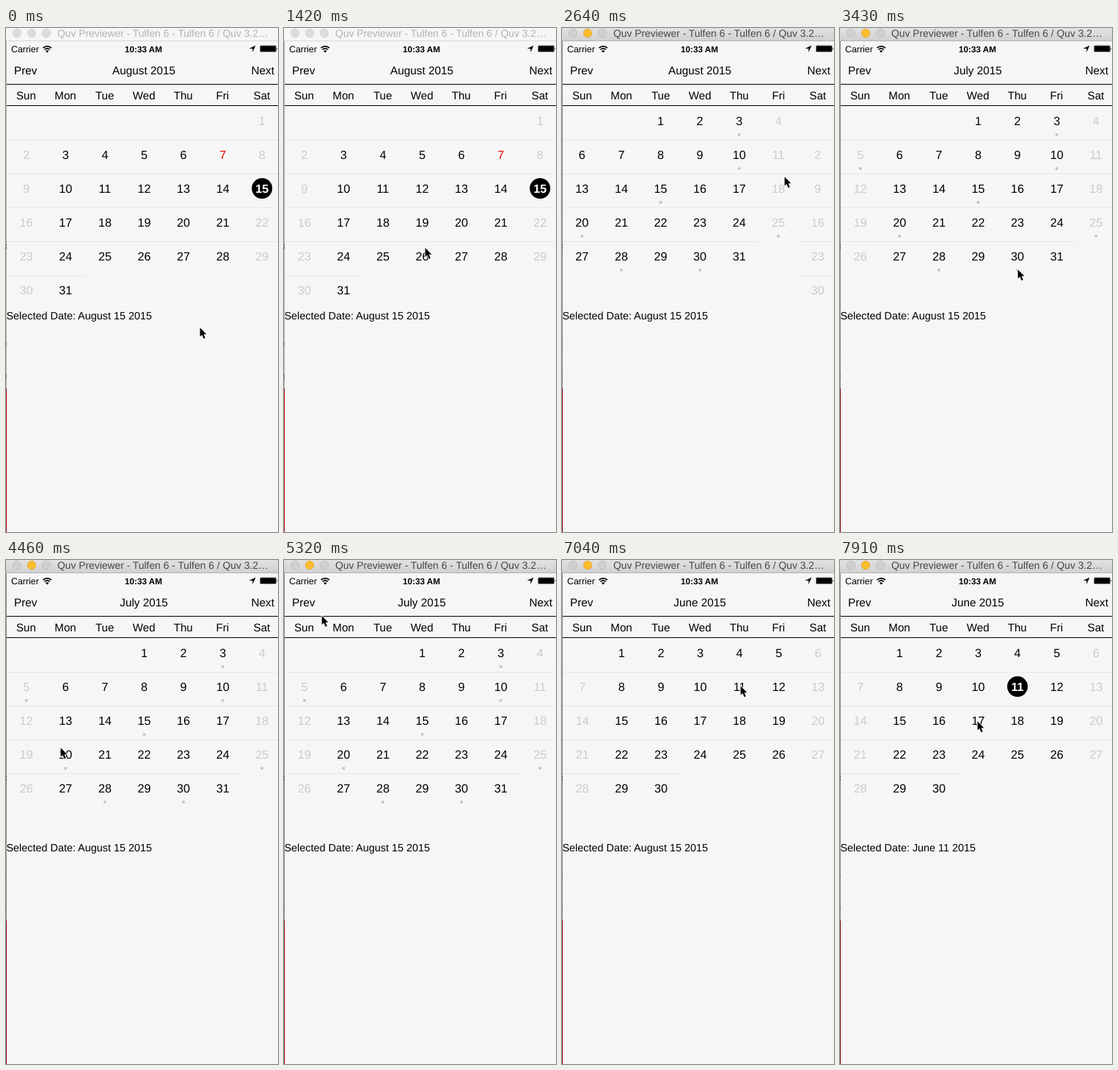
An HTML page for the animation above (8000 ms loop, 371 by 685 pixels).

```html
<!DOCTYPE html>
<html lang="en">
<head>
<meta charset="utf-8">
<title>Calendar demo</title>
<style>
  html, body { margin: 0; width: 100%; height: 100%; overflow: hidden; background: #f6f6f6; }
  svg { display: block; width: 371px; height: 685px; font-family: "Liberation Sans", Arial, sans-serif; text-rendering: geometricPrecision; }
  .mid { text-anchor: middle; }
  .end { text-anchor: end; }
  .nav { font-size: 15.3px; }
  .week { font-size: 15.1px; }
  .day { font-size: 16.2px; text-anchor: middle; }
  .bar { fill: #f6f6f6; }
  .edge { fill: #d8d8d8; }
  .title { fill: #b2b2b2; font-size: 13.85px; }
  .light { fill: #dcdcdc; stroke: #d0d0d0; stroke-width: .8; }
  .side { fill: #b4b4b4; }
  .red { fill: #b80000; }
  .active .bar { fill: url(#chrome); }
  .active .edge { fill: #b4b4b4; }
  .active .title { fill: #464646; }
  .active .light { fill: #d0d0d0; stroke: #bcbcbc; }
  .active .mini { fill: #fdbd2f; stroke: #e0a12a; }
  .active .side { fill: #8c8c8c; }
  .active .red { fill: #8e000c; }
</style>
</head>
<body>
<svg id="stage" viewBox="0 0 371 685">
  <defs>
    <linearGradient id="chrome" x2="0" y2="1">
      <stop stop-color="#e2e2e2"/><stop offset="1" stop-color="#d0d0d0"/>
    </linearGradient>
  </defs>
  <rect width="371" height="685" fill="#f6f6f6"/>
  <g id="pages"></g>

  <rect class="side" y="18" width="1" height="472"/>
  <rect class="red" y="490" width="1" height="195"/>
  <path d="M0 294h1v2h-1zM0 298h1v2h-1z" fill="#444"/>
  <path d="M0 427h1v4h-1zM0 470h1v7h-1z" fill="#777"/>

  <rect class="bar" width="371" height="18"/>
  <rect class="edge" y="17" width="371" height="1"/>
  <circle class="light" cx="15" cy="7" r="5.7"/>
  <circle class="light mini" cx="35" cy="7" r="5.7"/>
  <circle class="light" cx="55" cy="7" r="5.7"/>
  <text class="title" x="70" y="12">Quv Previewer - Tulfen 6 - Tulfen 6 / Quv 3.2…</text>

  <text x="7" y="33" font-size="12.4">Carrier</text>
  <g fill="none" stroke="#000" stroke-width="1.8">
    <path d="M50.5 27.2a8 8 0 0 1 11.4 0M52.6 29.5a5 5 0 0 1 7.2 0"/>
  </g>
  <path d="M56.2 33.6l-2.2-2.3a3.1 3.1 0 0 1 4.4 0z"/>
  <text class="mid" x="187.5" y="33" font-size="11.7" font-weight="bold">10:33 AM</text>
  <path d="M340.5 23.7l-4.2 9.2v-4.8l-4.8-.1z"/>
  <rect x="346.2" y="23.6" width="22.6" height="9.2" rx="1.6" fill="#777"/>
  <rect x="347" y="24.4" width="21" height="7.6" rx=".8"/>
  <path d="M369.4 26.5q1.6 1.7 0 3.4z"/>

  <text class="nav" x="11" y="63">Prev</text>
  <text class="nav mid" id="month" x="188" y="63"></text>
  <text class="nav end" x="366" y="63">Next</text>
  <rect x="1" y="76" width="370" height="1"/>
  <g id="week"></g>
  <rect x="1" y="105" width="370" height="1"/>
  <text id="picked" x="0.5" y="396" font-size="14.4"></text>

  <path id="cursor" d="M.6 1.2V13.6L3.4 11 5.6 16.2 7.8 15.3 5.6 10.2H9.4Z" stroke="#fff" stroke-width="1.6" paint-order="stroke"/>
</svg>
<script>
const LOOP = 8000, START = 810, STEP = 86.585;
const PAGE = 375, CELL = PAGE / 7, ROW = 46;
const $ = id => document.getElementById(id);

function add(parent, tag, attrs, text = '') {
  const node = document.createElementNS('http://www.w3.org/2000/svg', tag);
  for (const key in attrs) node.setAttribute(key, attrs[key]);
  node.textContent = text;
  parent.append(node);
  return node;
}

const centre = col => 1 + CELL * (col + .5);

'Sun Mon Tue Wed Thu Fri Sat'.split(' ').forEach((name, col) =>
  add($('week'), 'text', { class: 'week mid', x: centre(col) - .3, y: 97 }, name));

function buildMonth({ first, days, x = 0, dots = [], today, chosen }) {
  const page = add($('pages'), 'g', { transform: `translate(${x})` });
  let mark;
  for (let day = 1; day <= days; day++) {
    const slot = first + day - 1, col = slot % 7, row = Math.floor(slot / 7);
    const cx = centre(col), top = row * ROW;
    if (row) add(page, 'rect', { x: cx - CELL / 2, y: 106 + top, width: CELL, height: 1, fill: '#e7e7e7' });
    const fill = day === today ? '#f00000' : col % 6 ? '#000' : '#cbcbcb';
    add(page, 'text', { class: 'day', x: cx, y: 132.4 + top, fill }, day);
    if (dots.includes(day)) add(page, 'circle', { cx, cy: 145 + top, r: 2.1, fill: '#c6c6c6' });
    if (day === chosen) {
      mark = add(page, 'g', {});
      add(mark, 'circle', { cx, cy: 126 + top, r: 14 });
      add(mark, 'text', { class: 'day', x: cx, y: 132.2 + top, fill: '#fff', 'font-weight': 'bold' }, day);
    }
  }
  return { page, mark };
}

const july = buildMonth({ first: 3, days: 31, x: -PAGE, dots: [3, 5, 10, 15, 20, 25, 28, 30] });
const august = buildMonth({ first: 6, days: 31, today: 7, chosen: 15 });
const june = buildMonth({ first: 1, days: 30, chosen: 11 });

// [step, x, y]
const pointer = [
  [-1, 264, 406], [0, 262, 406], [3, 257, 407], [4, 257, 407], [5, 248, 384],
  [10, 108, 168], [11, 108, 168], [12, 104, 186], [14, 98, 205], [16, 127, 205],
  [21, 303, 201], [22, 301, 205], [30, 242, 327], [32, 241, 327], [41, 74, 266],
  [42, 74, 254], [46, 200, 215], [48, 258, 166], [51, 80, 86], [53, 22, 63],
  [62, 22, 63], [71, 243, 170], [74, 243, 170], [81, 184, 215], [82, 187, 218]
];
// [step, page offset]
const swipe = [[14, 0], [15, 11], [16, 31.5], [18, 120], [20, 262], [21, 321], [22, 363], [23, PAGE]];
const ACTIVATE = 13, TO_JULY = 24, TO_JUNE = 57, PICK = 75;

function sample(keys, at) {
  if (at <= keys[0][0]) return keys[0].slice(1);
  const i = keys.findIndex(key => key[0] >= at);
  if (i < 0) return keys[keys.length - 1].slice(1);
  const a = keys[i - 1], b = keys[i], p = (at - a[0]) / (b[0] - a[0]);
  return a.slice(1).map((v, n) => v + (b[n + 1] - v) * p);
}

const show = (node, on) => node.setAttribute('visibility', on ? 'visible' : 'hidden');
const write = (node, text) => { if (node.textContent !== text) node.textContent = text; };

function draw(time) {
  const step = Math.max(-1, Math.floor((time - START + 2) / STEP));
  const [offset] = sample(swipe, step), [x, y] = sample(pointer, step);
  const inJune = step >= TO_JUNE, picked = step >= PICK;

  $('stage').classList.toggle('active', step >= ACTIVATE);
  $('pages').setAttribute('transform', `translate(${inJune ? 0 : offset})`);
  show(july.page, !inJune);
  show(august.page, !inJune);
  show(june.page, inJune);
  show(june.mark, inJune && picked);
  write($('month'), (inJune ? 'June' : step >= TO_JULY ? 'July' : 'August') + ' 2015');
  write($('picked'), 'Selected Date: ' + (picked ? 'June 11 2015' : 'August 15 2015'));
  $('cursor').setAttribute('transform', `translate(${x} ${y})`);
}

const begin = performance.now();
function tick() {
  draw((performance.now() - begin) % LOOP);
  requestAnimationFrame(tick);
}
tick();
</script>
</body>
</html>
```
